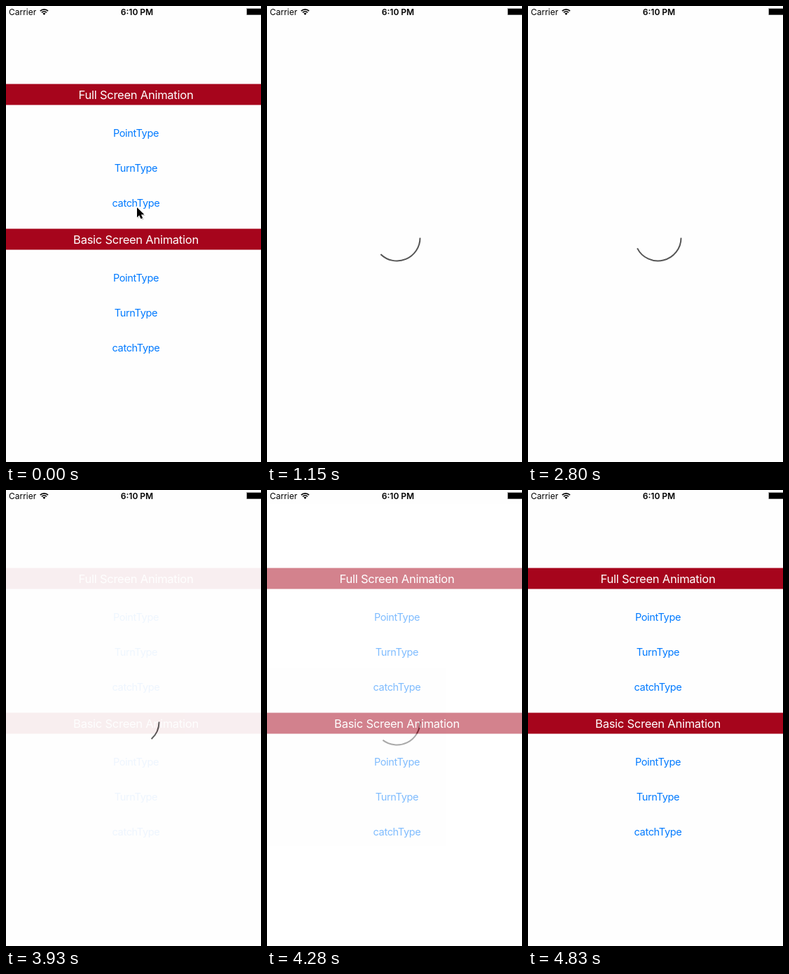
An HTML page that plays this animation: 364x652 px, repeating every 4.87 s.

```html
<!DOCTYPE html>
<html lang="en">
<head>
<meta charset="utf-8">
<title>Arc loader</title>
<style>
  html, body { margin: 0; width: 100%; height: 100%; overflow: hidden; background: #fefefe; }
  svg { display: block; width: 364px; height: 652px; }
  text { font-family: Inter, "Liberation Sans", sans-serif; }
  .bars rect { fill: #a6051c; }
  .titles { fill: #fff; font-size: 16.5px; letter-spacing: -.25px; text-anchor: middle; }
  .links { fill: #007aff; font-size: 14.5px; letter-spacing: -.33px; text-anchor: middle; }
  .status { font-size: 12px; }
  .time { font-weight: 600; text-anchor: middle; }
  .wifi { fill: none; stroke: #000; stroke-width: 1.7; }
  #arc { fill: none; stroke: #555; stroke-width: 2; }
</style>
</head>
<body>
<svg viewBox="0 0 364 652">
  <rect width="364" height="652" fill="#fefefe"/>

  <g class="bars">
    <rect y="111.5" width="364" height="30"/>
    <rect y="318.5" width="364" height="30"/>
  </g>
  <g class="titles">
    <text x="185.5" y="133">Full Screen Animation</text>
    <text x="185.5" y="340">Basic Screen Animation</text>
  </g>
  <g class="links">
    <text x="185.5" y="187">PointType</text>
    <text x="185.5" y="237">TurnType</text>
    <text x="185.5" y="287">catchType</text>
    <text x="185.5" y="394">PointType</text>
    <text x="185.5" y="444">TurnType</text>
    <text x="185.5" y="494">catchType</text>
  </g>

  <g id="cover">
    <rect y="20" width="364" height="632" fill="#fefefe"/>
    <path id="arc"/>
  </g>

  <g class="status">
    <text x="4" y="12.8">Carrier</text>
    <text class="time" x="187" y="12.8">6:10 PM</text>
    <g class="wifi">
      <path d="M48.8 7.2A8 8 0 0 1 60 7.2"/>
      <path d="M51 9.3A4.9 4.9 0 0 1 57.8 9.3"/>
    </g>
    <path d="M54.4 12.9L52.4 10.8A2.9 2.9 0 0 1 56.4 10.8Z"/>
    <rect x="343" y="3" width="21" height="10" fill="#aaa"/>
    <rect x="344" y="4" width="20" height="8.5"/>
  </g>

  <g id="cursor">
    <path d="M1 1.5V16L4.5 13L7 18L10 17L7.5 12H12Z" fill="#000" opacity=".18"/>
    <path d="M0 0V14.2L3.2 11.2L5.5 16.3L8.2 15.2L5.9 10.2H10.4Z"
          stroke="#fff" stroke-width="1.6" paint-order="stroke"/>
  </g>
</svg>
<script>
const LOOP = 4870, BEGIN = 540, STEP = 87.23;   // the picture updates every STEP ms
const CX = 185.5, CY = 331.5, R = 33;
const TURN = 1576, TAIL = 0.549;                // the tail leaves at this share of a turn
const TURNS = [561, 2137, 3732];

const cover = document.getElementById('cover');
const arc = document.getElementById('arc');
const cursor = document.getElementById('cursor');
const clamp = v => Math.min(1, Math.max(0, v));
const span = (t, from, length) => clamp((t - from) / length);

function point(turn) {
  const a = turn * 2 * Math.PI;
  return (CX + R * Math.cos(a)).toFixed(2) + ' ' + (CY + R * Math.sin(a)).toFixed(2);
}

function arcPath(t) {
  const begin = TURNS.filter(s => s <= t).pop();
  if (begin === undefined) return '';
  const head = span(t, begin, TURN);
  const tail = clamp((head - TAIL) / (1 - TAIL));
  if (head - tail < 0.002) return '';
  const large = head - tail > 0.5 ? 1 : 0;
  return `M${point(tail)}A${R} ${R} 0 ${large} 1 ${point(head)}`;
}

function draw(time) {
  const loading = time >= BEGIN;
  const t = loading ? BEGIN + STEP * Math.floor((time - BEGIN) / STEP + 0.15) : 0;

  cover.style.opacity = loading ? 1 - Math.pow(span(t, 3820, 740), 1.53) : 0;
  arc.setAttribute('d', arcPath(t));

  const m = span(t, 690, 370), ease = m * m * (3 - 2 * m);
  cursor.setAttribute('transform', `translate(${187 + 132 * ease} ${288 + 353 * ease})`);
  cursor.style.display = t < 1100 ? '' : 'none';
}

const origin = performance.now();
function frame() {
  draw((performance.now() - origin) % LOOP);
  requestAnimationFrame(frame);
}
frame();
</script>
</body>
</html>
```
